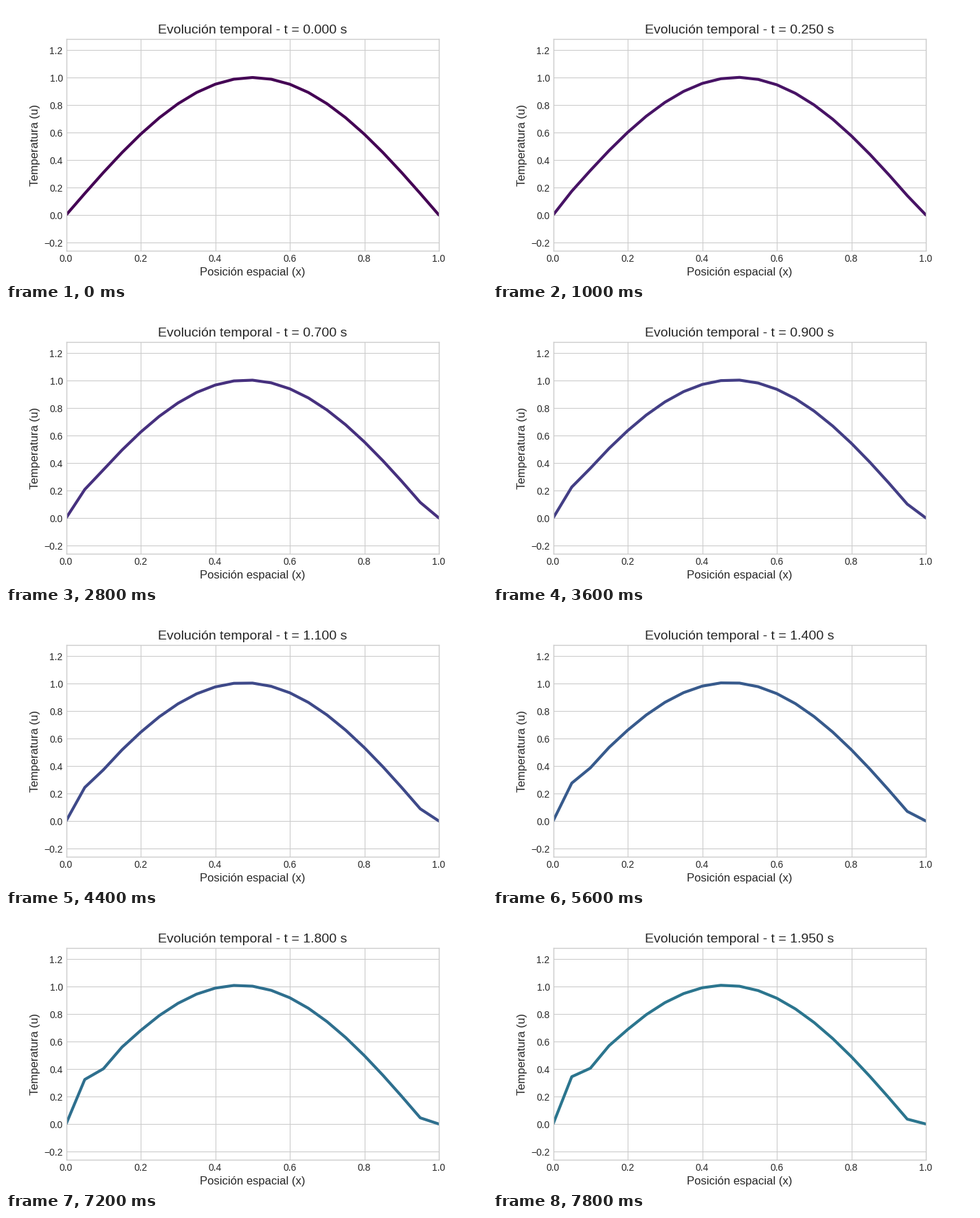
Animation of 700 by 400 pixels, one loop 8000 ms. Source, as a matplotlib script:

```python
import numpy as np
import matplotlib.pyplot as plt
from matplotlib.animation import FuncAnimation

plt.style.use("seaborn-v0_8-whitegrid")
plt.rcParams.update({
    "font.family": "sans-serif",
    "font.sans-serif": ["Liberation Sans"],
    "axes.unicode_minus": True,
})

FRAMES = 40
INTERVAL = 200      # ms
DT = 0.05           # simulated seconds per frame
SPEED = 0.02
CELLS = 20
COLOR_STEPS = 100

x = np.linspace(0, 1, CELLS + 1)


def solve():
    """Implicit backward-difference advection with fixed zero ends."""
    r = SPEED * DT * CELLS
    u = np.sin(np.pi * x)
    u[-1] = 0
    states = [u]
    for _ in range(FRAMES - 1):
        new = np.zeros_like(u)
        for i in range(1, CELLS):
            new[i] = (u[i] - r * new[i - 1]) / (1 - r)
        u = new
        states.append(u)
    return states


states = solve()

fig, ax = plt.subplots(figsize=(7, 4), dpi=100)
ax.set_xlim(0, 1)
ax.set_ylim(-0.26, 1.28)
ax.set_xlabel("Posición espacial (x)", fontsize=12)
ax.set_ylabel("Temperatura (u)", fontsize=12)
title = ax.set_title("", fontsize=14)
line, = ax.plot([], [], lw=3)


def update(k):
    line.set_data(x, states[k])
    line.set_color(plt.cm.viridis(k / COLOR_STEPS))
    title.set_text(f"Evolución temporal - t = {k * DT:.3f} s")
    return line, title


anim = FuncAnimation(fig, update, frames=FRAMES, interval=INTERVAL,
                     init_func=lambda: update(0), repeat=True, blit=False)
plt.show()
```
